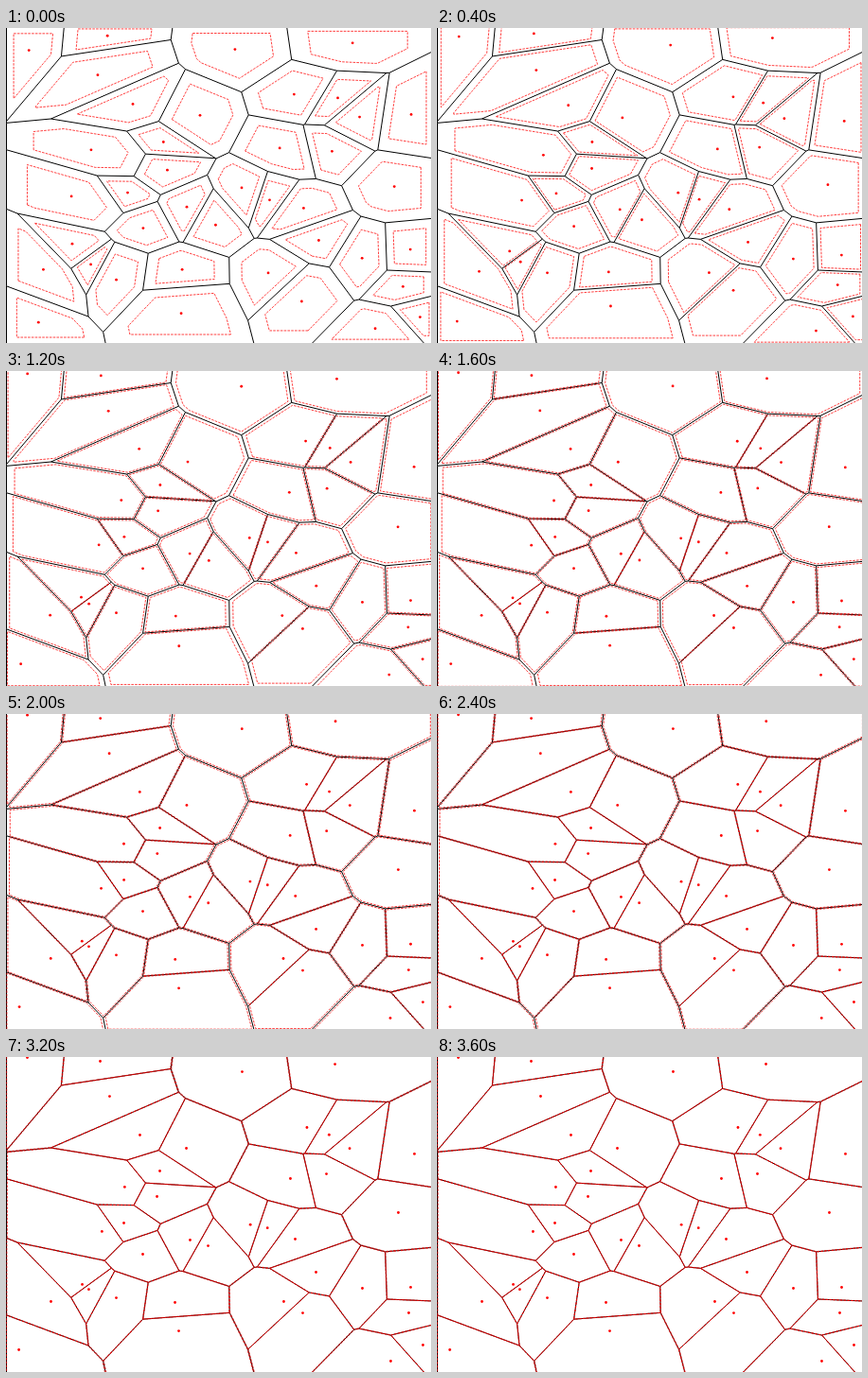
Animation of 449x333 px, one loop 3.8 s. Source, as an HTML page with a canvas:

```html
<!DOCTYPE html>
<html lang="en">
<head>
<meta charset="utf-8">
<title>Voronoi fitting</title>
<style>
html, body { margin: 0; width: 100%; height: 100%; overflow: hidden; background: #fff; }
canvas { display: block; }
</style>
</head>
<body>
<canvas id="stage" width="449" height="333"></canvas>
<script>
const ctx = document.getElementById('stage').getContext('2d');
const STEP = 200, STEPS = 19;

// A unit square stretched to this box: distances are measured in the square
const box = { left: 0, top: -3, right: 451, bottom: 334 };
const STRETCH = ((box.right - box.left) / (box.bottom - box.top)) ** 2;

const generators = [
  [22, 0], [99, 4], [109, 41], [249, 15], [347, 7], [141, 82], [190, 96], [317.5, 74],
  [340.8, 81.8], [362.5, 96.2], [431, 102], [125, 137], [162, 120], [159, 147],
  [124, 175], [101, 184], [300, 128], [338, 123], [414, 164], [257.7, 176.8],
  [275.7, 180.2], [305, 192], [194, 193], [213, 199], [144, 208], [178, 259],
  [293, 258], [327, 227], [376, 244], [427, 243], [425, 270], [440, 304], [406, 321],
  [313, 270], [182, 289], [116, 254], [86.9, 245.2], [80.1, 240], [47, 258], [13, 309]
];

const mix = (from, to, amount) => from.map((value, axis) => value + (to[axis] - value) * amount);
const distance = ([ax, ay], [bx, by]) => (ax - bx) ** 2 + STRETCH * (ay - by) ** 2;
const eachEdge = (corners, visit) =>
  corners.forEach((p, i) => visit(p, corners[(i + 1) % corners.length]));

// Keep the part of a polygon that is nearer to one point than to another
function keepNearer(corners, own, other) {
  const kept = [];
  const excess = p => distance(p, own) - distance(p, other);
  eachEdge(corners, (p, q) => {
    const a = excess(p), b = excess(q);
    if (a <= 0) kept.push(p);
    if (a * b < 0) kept.push(mix(p, q, a / (a - b)));
  });
  return kept;
}

function voronoiCell(own) {
  const { left, top, right, bottom } = box;
  const whole = [[left, top], [right, top], [right, bottom], [left, bottom]];
  return generators.reduce(
    (corners, other) => other === own ? corners : keepNearer(corners, own, other), whole);
}

function centroid(corners) {
  let area = 0, x = 0, y = 0;
  eachEdge(corners, (p, q) => {
    const cross = p[0] * q[1] - q[0] * p[1];
    area += cross;
    x += (p[0] + q[0]) * cross;
    y += (p[1] + q[1]) * cross;
  });
  return [x / (3 * area), y / (3 * area)];
}

const cells = generators.map(generator => {
  const corners = voronoiCell(generator);
  return { generator, corners, middle: centroid(corners) };
});

// Share of the way that each corner is still pulled in towards its site
const shrinkAt = step => 0.25 * 0.81 ** step + 0.07 * 0.1 ** step;
// Share of the way that each site still is from its generator to the cell's middle
const driftAt = step => 0.7 * (shrinkAt(step) / shrinkAt(0)) ** 1.5;

function strokeLoop(corners) {
  ctx.beginPath();
  corners.forEach(([x, y]) => ctx.lineTo(x, y));
  ctx.closePath();
  ctx.stroke();
}

// Neighbours run along a shared edge in opposite directions, so one of them draws it
function strokeBorders() {
  ctx.beginPath();
  cells.forEach(({ corners }) => eachEdge(corners, (p, q) => {
    if (q[0] < p[0]) return;
    ctx.moveTo(...p);
    ctx.lineTo(...q);
  }));
  ctx.stroke();
}

function draw(step) {
  ctx.setTransform(1, 0, 0, 1, 0, 0);
  ctx.fillStyle = '#fff';
  ctx.fillRect(0, 0, 449, 333);
  ctx.translate(0.5, 0.5);

  ctx.setLineDash([]);
  ctx.lineWidth = 1;
  ctx.strokeStyle = '#000';
  strokeBorders();

  ctx.setLineDash([2.6, 1.2]);
  ctx.lineWidth = 0.75;
  ctx.strokeStyle = ctx.fillStyle = '#f00';
  const shrink = shrinkAt(step), drift = driftAt(step);
  cells.forEach(({ generator, corners, middle }) => {
    const site = mix(generator, middle, drift);
    strokeLoop(corners.map(corner => mix(corner, site, shrink)));
    ctx.beginPath();
    ctx.arc(...site, 1.4, 0, Math.PI * 2);
    ctx.fill();
  });
}

let shown = -1;
const start = performance.now();
function tick() {
  const step = Math.floor((performance.now() - start) / STEP) % STEPS;
  if (step !== shown) draw(shown = step);
  requestAnimationFrame(tick);
}
tick();
</script>
</body>
</html>
```
